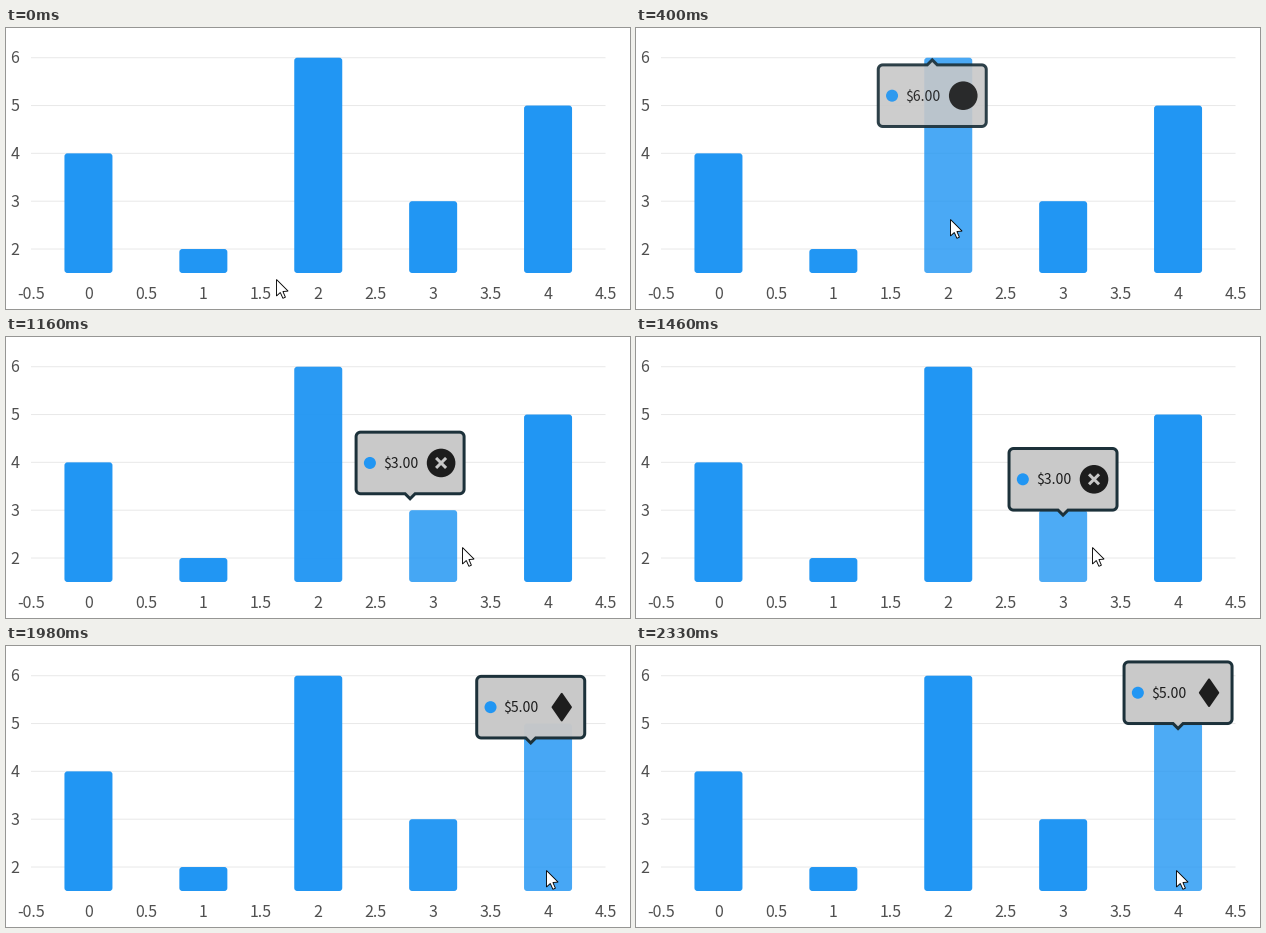
Animation of 624 by 281 pixels, one loop 2.53 s. Source, as a matplotlib script:

```python
import numpy as np
import matplotlib.pyplot as plt
from matplotlib.animation import FuncAnimation
from matplotlib.patches import Circle, FancyBboxPatch, Polygon
from matplotlib.transforms import Affine2D

W, H, DPI = 624, 281, 64
PX = 72 / DPI  # points per pixel
LOOP, STEP = 2530, 10

LEFT, RIGHT, FLOOR = 25, 599.5, 245
VALUES = [4, 2, 6, 3, 5]
BLUE, INK, EDGE, PANEL = "#2196f3", "#1d1d1d", "#1c313a", "#c8c8c8"

TIP_W, TIP_H, TIP_ARROW = 54, 30.8, 5  # half width, half height, arrow size
TARGETS = [2, 3, 4]  # bars hovered in turn

# The screen refreshes every 50 ms, counted anew from each wake time
WAKES = np.array([0, 860, 1680])
REFRESH = 50

# Start times of the tooltip's glides and of the pointer's moves
GLIDES, GLIDE = np.array([45, 903, 1690]), 620
MOVES, MOVE = np.array([20, 820, 1640]), 240
POINTER = np.array([(270.5, 251.5), (314.5, 191.5), (456.5, 210.5), (540.5, 224.5)])


def bar_x(v):
    return LEFT + (v + 0.5) * (RIGHT - LEFT) / 5


def bar_y(v):
    return 29.7 + (6 - v) * 47.83


def tip_stop(i):
    """Tooltip centre for a bar: above it, or below its top if there is no room."""
    top = bar_y(VALUES[i])
    return bar_x(i), top - TIP_H if top > 2 * TIP_H else top + TIP_H


def bubble(up, r=4.5):
    """Rounded box around the origin with a small arrow above or below."""
    a, pts = TIP_ARROW, []
    for quarter in range(4):
        turn = np.radians(90 * quarter + np.linspace(0, 90, 8))
        cx = (TIP_W - r) * (1 if quarter in (0, 3) else -1)
        cy = (TIP_H - r) * (1 if quarter < 2 else -1)
        pts += zip(cx + r * np.cos(turn), cy + r * np.sin(turn))
        if quarter == 0:
            pts += [(a, TIP_H), (0, TIP_H + a), (-a, TIP_H)]
    return np.array(pts) * (1, -1 if up else 1)


def progress(t, starts, span):
    return np.clip((t - starts) / span, 0, 1)


def ease_out(u):
    return 1 - (1 - u) ** 3


def smooth(u):
    return u * u * (3 - 2 * u)


def along(stops, p):
    return stops[0] + p @ np.diff(stops, axis=0)


stops = np.array([tip_stop(i) for i in TARGETS])
stops = np.vstack([stops[0] + (-205, 28), stops])

fig = plt.figure(figsize=(W / DPI, H / DPI), dpi=DPI, facecolor="white")
ax = fig.add_axes([0, 0, 1, 1])
ax.axis("off")


def label(x, y, text, size, color, **kw):
    return ax.text(x, y, text, fontsize=size * PX, color=color,
                   family="Noto Sans CJK JP", va="baseline", **kw)


# Grid and axis labels
for v in range(2, 7):
    ax.plot([LEFT, RIGHT], [bar_y(v)] * 2, color="#e9e9e9", lw=PX, zorder=1,
            snap=False, solid_capstyle="butt")
    label(8.8, bar_y(v) + 5.6, str(v), 16, "#505050", ha="center")
for k in range(-1, 10):
    label(bar_x(k / 2), 271.3, f"{k / 2:g}", 16, "#505050", ha="center")

bars = []
for i, v in enumerate(VALUES):
    top = bar_y(v)
    bar = FancyBboxPatch((bar_x(i) - 24, top), 48, FLOOR - top,
                         boxstyle="round,pad=0,rounding_size=3",
                         fc=BLUE, ec="none", zorder=2)
    bars.append(ax.add_patch(bar))

# Tooltip parts, drawn around its centre
tip_shift = Affine2D()
tip_space = tip_shift + ax.transData


def tip_patch(patch, z):
    patch.set_transform(tip_space)
    patch.set_zorder(z)
    return ax.add_patch(patch)


fill = tip_patch(Polygon(bubble(True), fc=PANEL, ec="none"), 5)
rim = tip_patch(Polygon(bubble(True), fc="none", ec=EDGE, lw=3 * PX), 6)
dot = tip_patch(Circle((-40.2, 0), 6, fc=BLUE, ec="none"), 7)
price = label(-27.3, 5, "", 14, INK, transform=tip_space, zorder=7)
disc = tip_patch(Circle((31, 0), 14.3, fc=INK, ec="none"), 7)
cross = [ax.plot([26, 36], [-5 * s, 5 * s], color=PANEL, lw=3 * PX, zorder=8,
                 solid_capstyle="butt", transform=tip_space)[0]
         for s in (1, -1)]
gem = tip_patch(Polygon([(31, -13.3), (40.2, 0), (31, 13.3), (21.8, 0)],
                        fc=INK, ec=INK, lw=2 * PX, joinstyle="round"), 7)
tip_parts = [rim, dot, price, disc, gem, *cross]

arrow_shift = Affine2D()
arrow = Polygon([(0, 0), (0, 16.5), (3.8, 13), (6.4, 18.8), (8.9, 17.7),
                 (6.4, 12), (11.6, 11.6)], fc="white", ec="black", lw=0.9 * PX,
                transform=arrow_shift + ax.transData, zorder=10)
ax.add_patch(arrow)

ax.set_xlim(0, W)
ax.set_ylim(H, 0)


def draw(i):
    now = i * STEP
    wake = WAKES[WAKES <= now][-1]
    t = wake + (now - wake) // REFRESH * REFRESH
    p = ease_out(progress(t, GLIDES, GLIDE))

    # Hovered bars turn translucent as the highlight moves on
    for target, glow in zip(TARGETS, p - np.append(p[1:], 0)):
        bars[target].set_alpha(1 - 0.2 * glow)

    stage = max((t >= GLIDES).sum() - 1, 0)
    below = stage == 0
    x, y = along(stops, p)
    tip_shift.clear().translate(x, y + TIP_ARROW * below)
    for part in (fill, rim):
        part.set_xy(bubble(below))
    fill.set_alpha(0.97 * p[0])
    for part in tip_parts:
        part.set_alpha(p[0])
    price.set_text(rf"\${VALUES[TARGETS[stage]]:.2f}")
    disc.set_visible(stage < 2)
    gem.set_visible(stage == 2)
    for line in cross:
        line.set_visible(stage == 1)

    arrow_shift.clear().translate(*along(POINTER, smooth(progress(t, MOVES, MOVE))))
    return []


anim = FuncAnimation(fig, draw, frames=LOOP // STEP, interval=STEP,
                     repeat=True, repeat_delay=0, blit=False)
plt.show()
```
